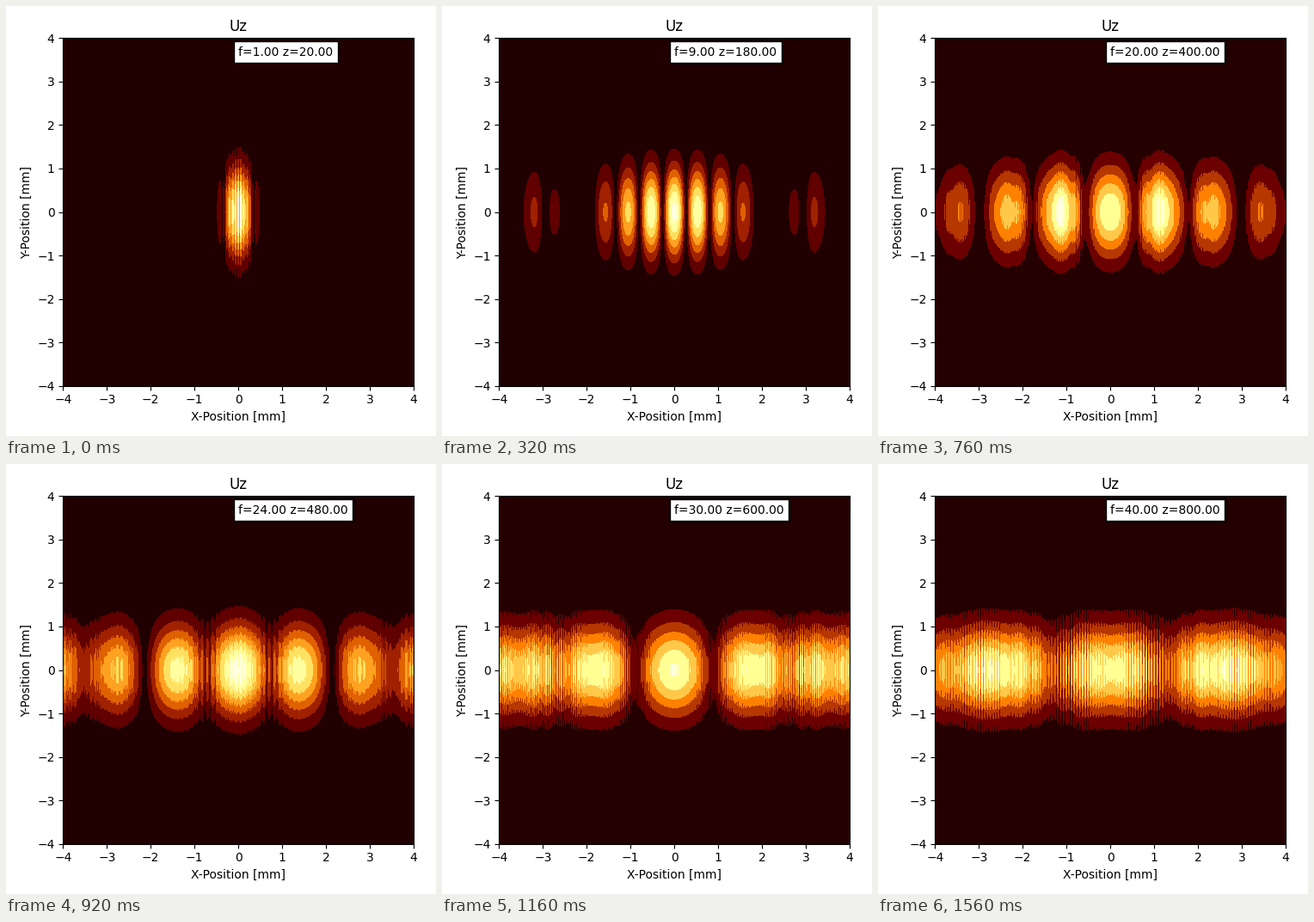
A matplotlib script that plays this animation: 500x500 px, repeating every 1.6 s.

```python
import numpy as np
import matplotlib.pyplot as plt
from matplotlib.animation import FuncAnimation

FRAMES = 40
N = 500
HALF = 4.0            # half width of the window [mm]
WAVELENGTH = 6.2e-4   # [mm]
SLIT_GAP, SLIT_WIDTH = 0.2, 0.05
BEAM_RADIUS = 1.03
PEAK = np.sqrt(2 / np.pi) / BEAM_RADIUS   # beam of unit power

x = np.linspace(-HALF, HALF, N)
freq = np.fft.fftfreq(N, x[1] - x[0])
beam = np.exp(-(x / BEAM_RADIUS) ** 2)
slits = PEAK * beam * (np.abs(np.abs(x) - SLIT_GAP / 2) <= SLIT_WIDTH / 2)


def propagate(field, z):
    """Carry a one-dimensional field over the distance z (Fresnel)."""
    transfer = np.exp(-1j * np.pi * WAVELENGTH * z * freq ** 2)
    return np.abs(np.fft.ifft(np.fft.fft(field) * transfer))


fig, ax = plt.subplots(figsize=(5, 5), dpi=100)
ax.set(title="Uz", xlabel="X-Position [mm]", ylabel="Y-Position [mm]")
fig.tight_layout()   # margins fit the unit axes, before the limits are set
ax.set(xlim=(-HALF, HALF), ylim=(-HALF, HALF))

# Labels pile up on each other, which darkens the box border.
labels = [ax.text(0, 3.6, f"f={n:.2f} z={20 * n:.2f}",
                  bbox=dict(facecolor="white"), visible=False)
          for n in range(1, FRAMES + 1)]
contours = []


def draw(i):
    while contours:
        contours.pop().remove()
    z = 20 * (i + 1)
    amplitude = np.outer(propagate(beam, z), propagate(slits, z))
    contours.append(ax.contourf(x, x, amplitude, cmap="afmhot"))
    for k, label in enumerate(labels):
        label.set_visible(k <= i)
    return contours + labels


anim = FuncAnimation(fig, draw, frames=FRAMES, interval=40,
                     init_func=lambda: [], repeat=True, repeat_delay=0)
plt.show()
```
